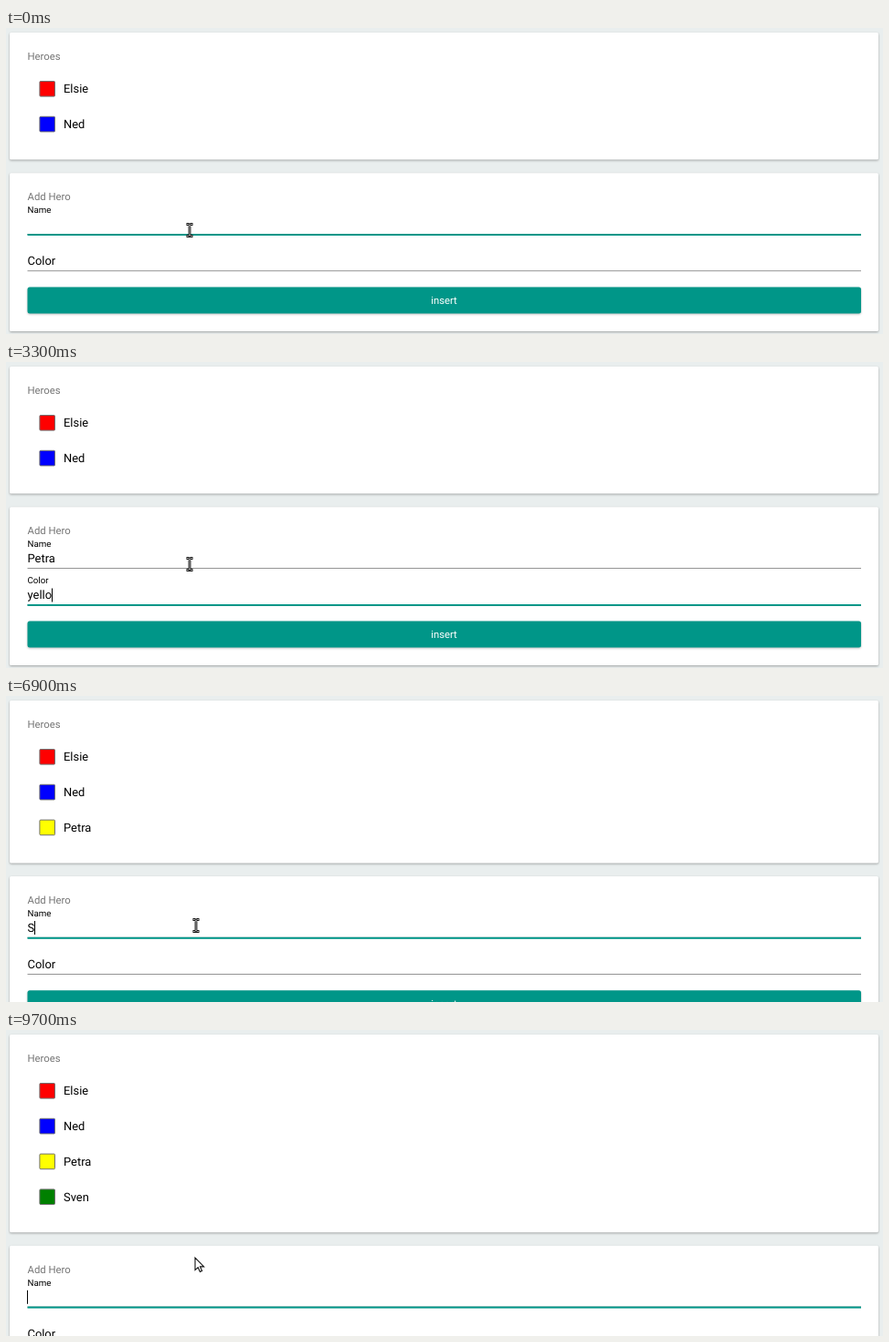
Write an HTML page that moves like this. It is 960 by 336 pixels and loops after 9800 ms.

```html
<!DOCTYPE html>
<html lang="en">
<head>
<meta charset="utf-8">
<title>Heroes</title>
<style>
  html, body { margin: 0; width: 100%; height: 100%; overflow: hidden; background: #e9eeee; }
  svg { display: block; width: 100vw; height: 100vh; }
  text { font-family: Roboto, sans-serif; font-size: 12.93px; fill: #000; white-space: pre; text-rendering: geometricPrecision; }
  .title { font-size: 11.32px; fill: #757575; }
  .label { font-size: 9.7px; }
  .card { fill: #fff; filter: drop-shadow(0 1px 1px rgba(0,0,0,.32)); }
  .swatch { stroke: #707070; stroke-width: 1; }
  .line { fill: #949494; }
  .ripple, .button { fill: #009688; }
  .button { filter: drop-shadow(0 1px 1px rgba(0,0,0,.25)); }
  .insert { font-size: 11.32px; fill: #fff; text-anchor: middle; }
</style>
</head>
<body>
<svg viewBox="0 0 960 336">
  <rect width="960" height="336" fill="#e9eeee"/>
  <rect id="listCard" class="card" x="4" y="5" width="951" height="139.6" rx="1.6"/>
  <text class="title" x="23.5" y="34.8">Heroes</text>
  <g id="heroes"></g>
  <g id="form">
    <rect class="card" x="4" y="159.2" width="951" height="173.8" rx="1.6"/>
    <text class="title" x="23.5" y="189">Add Hero</text>
    <text id="nameLabel" class="label" x="23.5" y="203">Name</text>
    <text id="nameText" x="23.5" y="220"></text>
    <rect class="line" x="23.5" y="226" width="912.5" height="1"/>
    <rect id="nameRipple" class="ripple" y="226" height="2"/>
    <text id="colorLabel">Color</text>
    <text id="colorText" x="23.5" y="260.3"></text>
    <rect class="line" x="23.5" y="266.2" width="912.5" height="1"/>
    <rect id="colorRipple" class="ripple" y="266" height="2"/>
    <rect id="caret" width="1" height="15"/>
    <rect class="button" x="23.5" y="284.5" width="912.5" height="29" rx="2.5"/>
    <text class="insert" x="479.5" y="302.8">insert</text>
  </g>
  <g id="beam" fill="none">
    <path d="M-3.5-6.5H-1.5L0-5.5L1.5-6.5H3.5M-3.5 6.5H-1.5L0 5.5L1.5 6.5H3.5M0-5.5V5.5" stroke="#111" stroke-width="2.8"/>
    <path d="M-3-6.5H-1.5L0-5.5L1.5-6.5H3M-3 6.5H-1.5L0 5.5L1.5 6.5H3M0-5.5V5.5" stroke="#ddd" stroke-width=".8"/>
  </g>
  <path id="arrow" d="M0 0V13.6L3.2 10.7L5.4 15.6L7.6 14.6L5.5 9.9H9.6Z" fill="#fff" stroke="#111" stroke-width="1.1"/>
</svg>
<script>
const LOOP = 9800, STEP = 100, ROW = 38.8, LEFT = 23.5, WIDTH = 912.5;
const TEAL = [0, 150, 136], GREY = [158, 158, 158];
const heroes = [['Elsie', '#f00'], ['Ned', '#00f'], ['Petra', '#ff0'], ['Sven', '#008000']];

// [time, text shown from then on]
const nameKeys = [[0, ''], [800, 'P'], [1200, 'Pet'], [1600, 'Petr'], [1700, 'Petra'],
  [4100, ''], [6900, 'S'], [7300, 'Sve'], [7700, 'Sven'], [9500, '']];
const colorKeys = [[0, ''], [2700, 'y'], [2900, 'yel'], [3300, 'yello'],
  [4100, ''], [8500, 'gr'], [8700, 'gree'], [9500, '']];
// [time, focused field, start of its underline]
const focusKeys = [[0, 'name', -1000], [2100, 'color', 2100], [4100, 'name', 4100],
  [7800, 'color', 7700], [9500, 'name', 9500]];
// [start, label floats up]
const floatKeys = [[-1000, 0], [2100, 1], [4000, 0], [7700, 1], [9400, 0]];

const $ = id => document.getElementById(id);
const set = (el, attrs) => { for (const k in attrs) el.setAttribute(k, attrs[k]); };
const clamp = v => Math.min(1, Math.max(0, v));
const mix = (a, b, p) => a + (b - a) * p;
const rgb = (a, b, p) => `rgb(${a.map((v, i) => Math.round(mix(v, b[i], p)))})`;
const last = (keys, t) => keys.filter(k => k[0] <= t).pop();
const show = (el, on) => el.setAttribute('visibility', on ? 'visible' : 'hidden');

// cubic-bezier(.25, .8, .25, 1)
function ease(x) {
  x = clamp(x);
  let lo = 0, hi = 1;
  for (let i = 0; i < 24; i++) {
    const s = (lo + hi) / 2;
    if (.75 * s * (1 - s) + s ** 3 < x) lo = s; else hi = s;
  }
  const s = (lo + hi) / 2, r = 1 - s;
  return 2.4 * r * r * s + 3 * r * s * s + s ** 3;
}

function make(tag, attrs, parent) {
  const el = document.createElementNS('http://www.w3.org/2000/svg', tag);
  set(el, attrs);
  return parent.appendChild(el);
}

const rows = heroes.map(([name, fill], i) => {
  const row = make('g', { transform: `translate(0 ${i * ROW})` }, $('heroes'));
  make('rect', { class: 'swatch', x: 36.9, y: 58.5, width: 16.6, height: 16.6, rx: 1, fill }, row);
  make('text', { x: 63, y: 71.2 }, row).textContent = name;
  return row;
});

function drawRipple(id, on, p) {
  const w = WIDTH * mix(.5, 1, p);
  set($(id), { x: LEFT + (WIDTH - w) / 2, width: w, opacity: on ? clamp(p * 1.5) : 0 });
}

function drawForm(t) {
  const [, field, start] = last(focusKeys, t);
  const onName = field === 'name';
  const p = ease((t - start) / 200);
  $('nameText').textContent = last(nameKeys, t)[1];
  $('colorText').textContent = last(colorKeys, t)[1];
  $('nameLabel').setAttribute('fill', rgb(GREY, TEAL, onName ? 1 : 1 - p));
  drawRipple('nameRipple', onName, p);
  drawRipple('colorRipple', !onName, p);

  const [from, up] = last(floatKeys, t);
  const e = ease((t - from) / 400), f = up ? e : 1 - e;
  set($('colorLabel'), {
    transform: `translate(${LEFT} ${mix(260.3, 243.4, f)}) scale(${mix(1, .75, f)})`,
    fill: rgb(GREY, TEAL, f)
  });

  const text = $(onName ? 'nameText' : 'colorText');
  const end = text.textContent ? text.getComputedTextLength() : 0;
  set($('caret'), { x: Math.round(LEFT + end - .3), y: onName ? 208.2 : 248.5 });
  show($('caret'), t >= 800 && !(t >= 5100 && t < 5600));
}

function drawPointer(t) {
  const p = clamp((t - 5200) / 600);
  const x = mix(201, 208, p), y = mix(222, 252, p);
  const arrow = t >= 9600 || (t >= 4200 && y < 246);
  $('beam').setAttribute('transform', `translate(${x} ${y})`);
  $('arrow').setAttribute('transform', `translate(${x - 1} ${y - 2})`);
  show($('arrow'), arrow);
  show($('beam'), !arrow);
}

function draw(t) {
  const added = (t >= 4100) + (t >= 9500);
  rows.forEach((row, i) => show(row, i < 2 + added));
  $('listCard').setAttribute('height', 139.6 + added * ROW);
  $('form').setAttribute('transform', `translate(0 ${added * ROW})`);
  drawForm(t);
  drawPointer(t);
}

const begin = performance.now();
function tick() {
  const t = (performance.now() - begin) % LOOP;
  draw(Math.floor(t / STEP) * STEP);
  requestAnimationFrame(tick);
}
tick();
</script>
</body>
</html>
```
